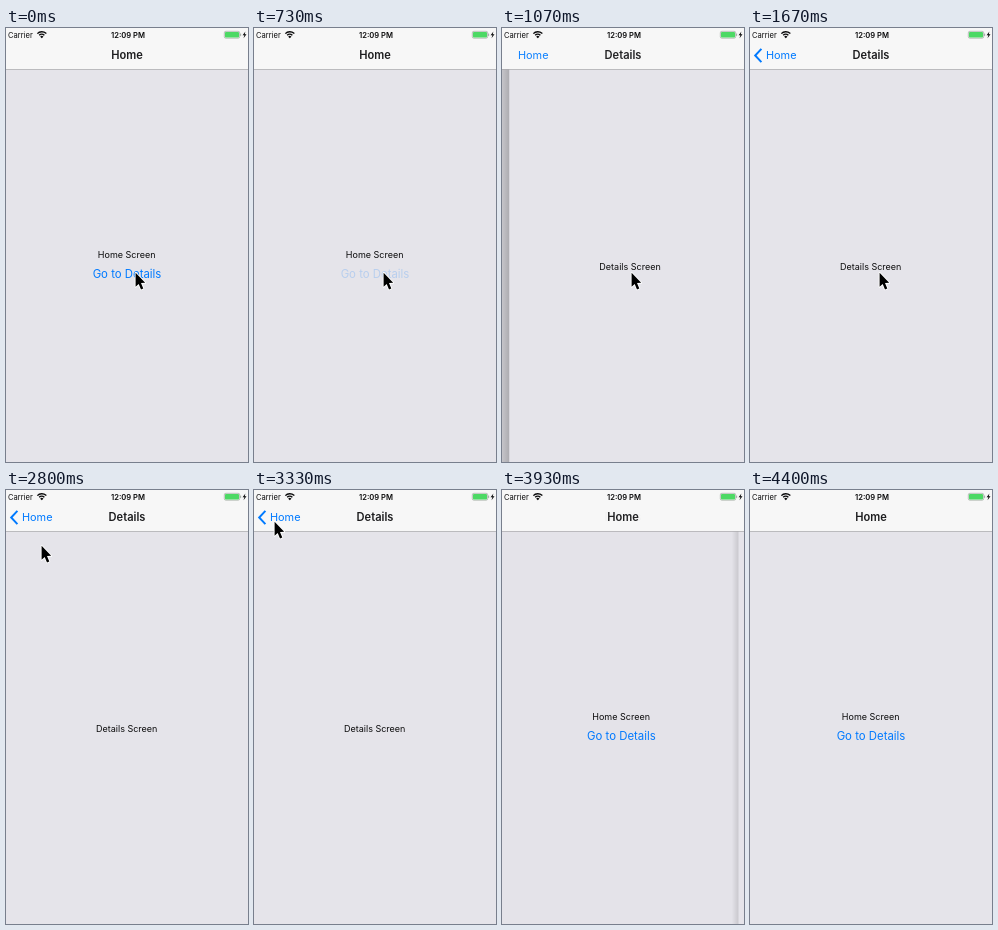
Recreate the animation shown at these times as an HTML page with a canvas. Size 242 by 434 pixels, loop 4940 ms.

```html
<!DOCTYPE html>
<html lang="en">
<head>
<meta charset="utf-8">
<title>Stack navigation</title>
<style>
  html, body { margin: 0; width: 100%; height: 100%; overflow: hidden; background: #e5e4ea; }
  canvas { display: block; width: 242px; height: 434px; }
</style>
</head>
<body>
<canvas id="stage"></canvas>
<script>
const W = 242, H = 434, LOOP = 4940, STEP = 200 / 3;
const BAR = 41;
const PAGE = '#e5e4ea', BLUE = '#007aff', INK = '#0c0c0d';
const PUSH = 845, POP = 3696;

const canvas = document.getElementById('stage');
const ctx = canvas.getContext('2d');
const ratio = window.devicePixelRatio || 1;
canvas.width = W * ratio;
canvas.height = H * ratio;

const clamp = x => Math.min(1, Math.max(0, x));
const mix = (a, b, k) => a + (b - a) * k;
const ramp = (t, from, to) => clamp((t - from) / (to - from));
const ease = k => k < 0.5 ? 2 * k * k : 1 - 2 * (1 - k) * (1 - k);

// Critically damped spring from 0 to 1
function spring(ms) {
  const u = Math.max(0, ms) * 0.0241;
  return 1 - (1 + u) * Math.exp(-u);
}

// 0 shows the home card, 1 the details card
function progress(t) {
  const p = t < POP ? spring(t - PUSH) : 1 - spring(t - POP);
  return p < 0.0008 ? 0 : p > 0.9992 ? 1 : p;
}

function linkAlpha(t) {
  if (t < 800) return mix(1, 0.2, ease(ramp(t, 585, 735)));
  return mix(0.2, 1, ease(ramp(t, 800, 1050)));
}

function backAlpha(t) {
  return t < 3530 ? 1 : mix(0.2, 1, ease(ramp(t, 3667, 3917)));
}

const PATH = [
  [2267, 129, 245], [2800, 35, 56], [3333, 20, 32],
  [3500, 20, 32], [3533, 4, 36], [3733, 4, 36], [3934, -14, 46]
];

function pointer(t) {
  if (t <= PATH[0][0]) return PATH[0].slice(1);
  for (let i = 1; i < PATH.length; i++) {
    const [t0, x0, y0] = PATH[i - 1], [t1, x1, y1] = PATH[i];
    if (t <= t1) {
      const k = ease(ramp(t, t0, t1));
      return [mix(x0, x1, k), mix(y0, y1, k)];
    }
  }
  return null;
}

function text(str, x, y, size, { color = INK, weight = 400, align = 'center', alpha = 1 } = {}) {
  if (alpha <= 0) return;
  ctx.save();
  ctx.globalAlpha *= alpha;
  ctx.font = `${weight} ${size}px Inter, sans-serif`;
  ctx.textAlign = align;
  ctx.fillStyle = color;
  ctx.fillText(str, x, y);
  ctx.restore();
}

function rect(x, y, w, h, color) {
  ctx.fillStyle = color;
  ctx.fillRect(x, y, w, h);
}

function trace(points, close) {
  ctx.beginPath();
  points.forEach(([x, y]) => ctx.lineTo(x, y));
  if (close) ctx.closePath();
}

function homeCard(t, p) {
  const x = -0.3 * W * p;
  rect(0, BAR, W, H - BAR, PAGE);
  text('Home Screen', x + 120.7, 230.2, 9);
  text('Go to Details', x + 121, 249.8, 11.4, { color: BLUE, alpha: linkAlpha(t) });
  rect(0, BAR, W, H - BAR, `rgba(0,0,0,${0.15 * p})`);
}

function detailsCard(p) {
  const x = W * (1 - p);
  if (p < 1) {
    const shade = ctx.createLinearGradient(x - 7, 0, x, 0);
    shade.addColorStop(0, 'rgba(0,0,0,0)');
    shade.addColorStop(1, 'rgba(0,0,0,0.12)');
    rect(x - 7, BAR, 7, H - BAR, shade);
  }
  rect(x, BAR, W, H - BAR, PAGE);
  text('Details Screen', x + 120.7, 242.2, 9);
}

function statusBar() {
  text('Carrier', 2, 9.6, 7.6, { align: 'left' });
  text('12:09 PM', 122, 9.6, 7.6, { weight: 600 });

  ctx.strokeStyle = INK;
  ctx.lineWidth = 1.4;
  for (const r of [3.6, 6.1]) {
    ctx.beginPath();
    ctx.arc(35.8, 9.8, r, -Math.PI * 0.76, -Math.PI * 0.24);
    ctx.stroke();
  }
  ctx.fillStyle = INK;
  ctx.beginPath();
  ctx.moveTo(35.8, 10.2);
  ctx.arc(35.8, 10.2, 2.2, -Math.PI * 0.76, -Math.PI * 0.24);
  ctx.fill();

  ctx.strokeStyle = '#8d9a8f';
  ctx.lineWidth = 0.6;
  ctx.beginPath();
  ctx.roundRect(218.3, 3.3, 15.4, 6.9, 1.6);
  ctx.stroke();
  ctx.fillStyle = '#4cd964';
  ctx.beginPath();
  ctx.roundRect(219, 4, 14, 5.5, 0.9);
  ctx.fill();
  rect(234.3, 5.6, 0.8, 2.3, '#8d9a8f');

  ctx.fillStyle = INK;
  trace([[239.4, 3.4], [236.6, 7.2], [238.4, 7.2], [237.5, 10.2], [240.5, 6.2], [238.7, 6.2]], true);
  ctx.fill();
}

function header(t, p) {
  rect(0, 0, W, BAR, '#f7f7f7');
  rect(0, BAR, W, 0.7, '#a9a9ac');
  statusBar();

  const title = { weight: 600, color: '#1c1c1e' };
  text('Home', 121, 31.3, 11.1, { ...title, alpha: 1 - p });
  text('Details', 121, 31.3, 11.1, { ...title, alpha: p });

  const alpha = clamp(2 * p - 1) * backAlpha(t);
  text('Home', 16, 31.4, 10.9, { color: BLUE, align: 'left', alpha });
  if (t >= 1660 && alpha > 0) {
    ctx.save();
    ctx.globalAlpha = alpha;
    ctx.strokeStyle = BLUE;
    ctx.lineWidth = 2;
    trace([[11.4, 20.9], [5.2, 27.5], [11.4, 34.1]]);
    ctx.stroke();
    ctx.restore();
  }
}

function cursor(t) {
  const at = pointer(t);
  if (!at) return;
  ctx.save();
  ctx.translate(at[0] + 0.6, at[1] - 0.2);
  trace([[0, 0], [0, 14], [3.1, 11.1], [5.4, 16.6], [7.7, 15.6], [5.4, 10.3], [9.6, 10]], true);
  ctx.lineJoin = 'round';
  ctx.strokeStyle = '#fff';
  ctx.lineWidth = 1.8;
  ctx.stroke();
  ctx.fillStyle = '#000';
  ctx.fill();
  ctx.restore();
}

function stepped(ms) {
  return Math.floor((ms + 4) / STEP) * STEP;
}

function draw(now) {
  const t = stepped(now % LOOP);
  const p = progress(t);
  ctx.setTransform(ratio, 0, 0, ratio, 0, 0);
  homeCard(t, p);
  if (p > 0) detailsCard(p);
  header(t, p);
  cursor(t);
}

const start = performance.now();
function tick() {
  draw(performance.now() - start);
  requestAnimationFrame(tick);
}
tick();
</script>
</body>
</html>
```
